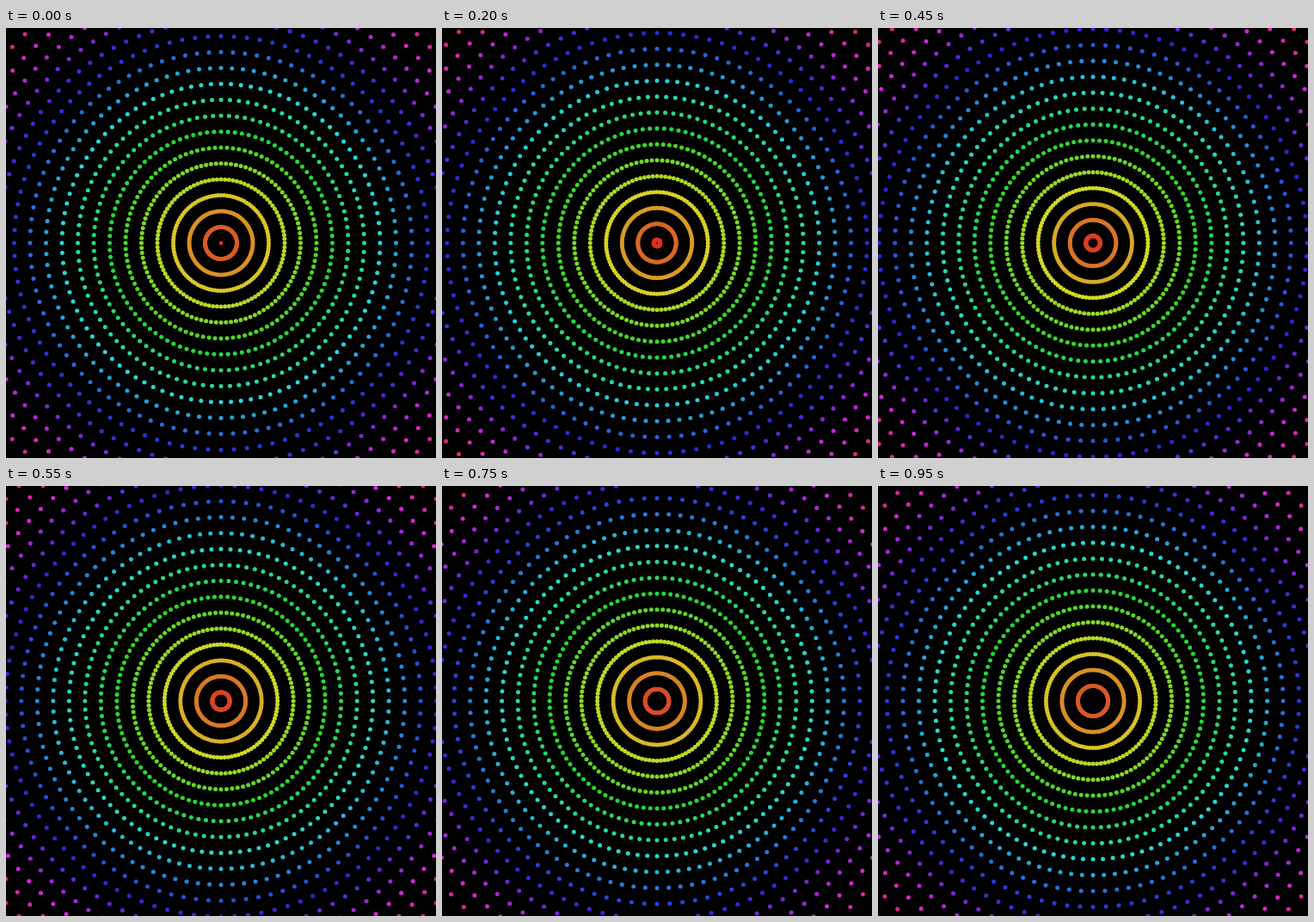
Animation of 500 by 500 pixels, one loop 1000 ms. Source, as an HTML page with a canvas:

```html
<!DOCTYPE html>
<html lang="en">
<head>
<meta charset="utf-8">
<title>Rainbow rings</title>
<style>
  html, body { margin: 0; width: 100%; height: 100%; overflow: hidden; background: #000; }
  canvas { display: block; width: 500px; height: 500px; }
</style>
</head>
<body>
<canvas id="stage" width="500" height="500"></canvas>
<script>
  const ctx = document.getElementById('stage').getContext('2d');
  const CENTER = 250;
  const RINGS = 20;
  const GAP = 18.5;
  const DOTS = 100;
  const DOT_RADIUS = 2.5;
  const LOOP = 1000;
  const STEP = 50;

  function drawRing(radius) {
    const count = radius ? DOTS : 1;
    const hue = 360 * radius / (RINGS * GAP);
    ctx.fillStyle = `hsl(${hue}, 70%, 50%)`;
    for (let i = 0; i < count; i++) {
      const angle = i * 2 * Math.PI / DOTS;
      const x = CENTER + radius * Math.cos(angle);
      const y = CENTER + radius * Math.sin(angle);
      ctx.beginPath();
      ctx.arc(x, y, DOT_RADIUS, 0, 2 * Math.PI);
      ctx.fill();
    }
  }

  function draw(step) {
    const shift = step * STEP / LOOP;
    ctx.fillStyle = '#000';
    ctx.fillRect(0, 0, 500, 500);
    for (let k = 0; k < RINGS; k++) drawRing((k + shift) * GAP);
  }

  // The rings grow in discrete steps, one gap per loop.
  let shown = -1;
  function tick() {
    const step = Math.floor((performance.now() % LOOP) / STEP);
    if (step !== shown) {
      shown = step;
      draw(step);
    }
    requestAnimationFrame(tick);
  }
  tick();
</script>
</body>
</html>
```
